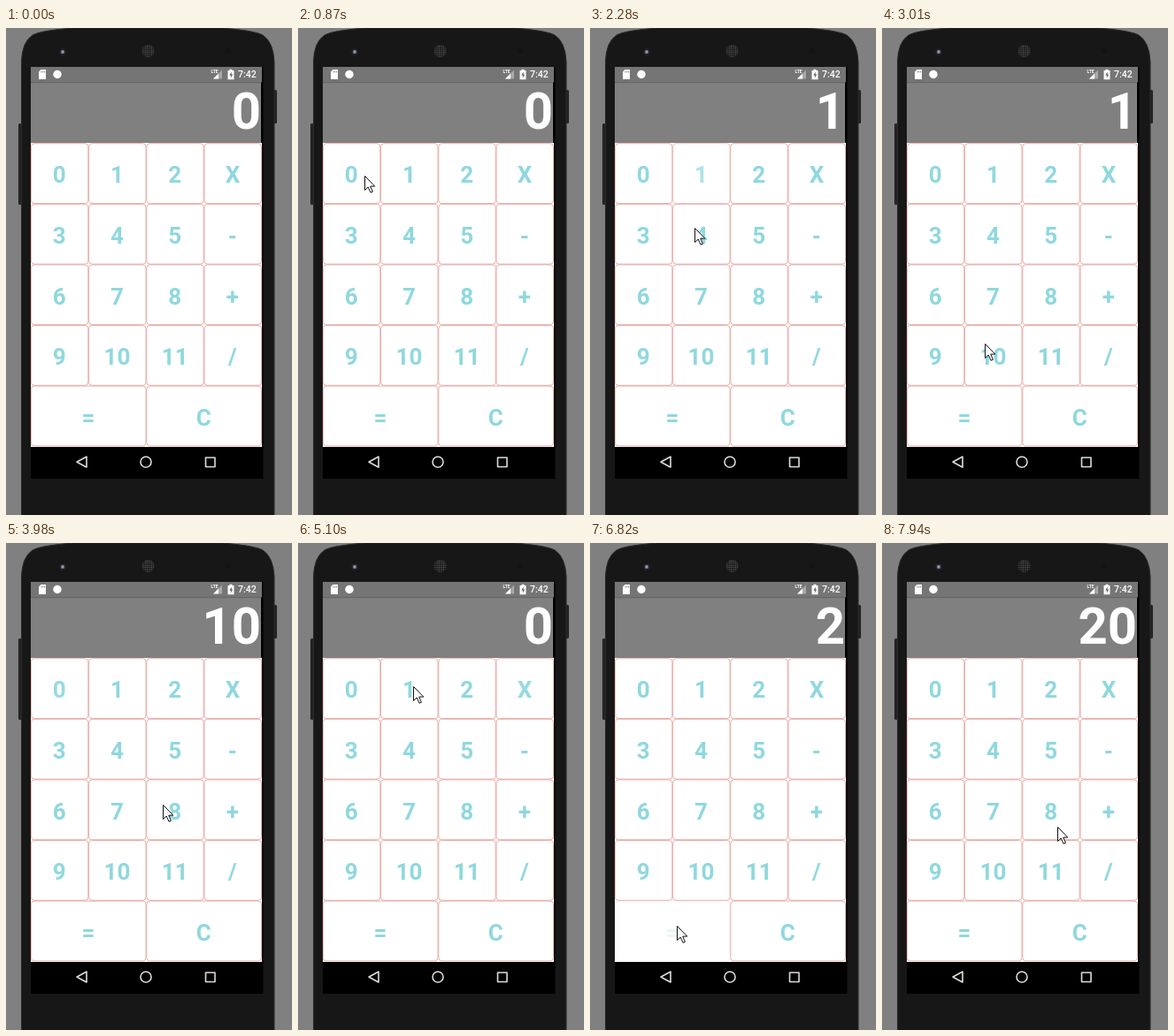
Write an HTML page that moves like this. It is 323 px wide and 551 px high and loops after 8000 ms.

```html
<!DOCTYPE html>
<html lang="en">
<head>
<meta charset="utf-8">
<title>Calculator</title>
<style>
html, body { margin: 0; width: 100%; height: 100%; overflow: hidden; background: #808080; }
svg { display: block; width: 100%; height: 100%; }
text { font-family: Roboto, Arial, sans-serif; font-weight: 700; }
.key text { font-size: 26px; fill: #8fd8de; text-anchor: middle; }
.key rect { fill: #fff; stroke: #e59b95; stroke-width: .8; }
#total { font-size: 58px; fill: #fff; text-anchor: end; }
.nav { fill: none; stroke: #dcdcdc; stroke-width: 1.6; stroke-linejoin: round; }
</style>
</head>
<body>
<svg viewBox="0 0 323 551">
  <defs>
    <pattern id="mesh" width="2.4" height="2.4" patternUnits="userSpaceOnUse">
      <rect width="2.4" height="2.4" fill="#161616"/>
      <circle cx="1.2" cy="1.2" r=".8" fill="#5a5a5a"/>
    </pattern>
  </defs>
  <rect width="323" height="551" fill="#808080"/>

  <!-- phone body -->
  <rect x="14" y="108" width="4" height="92" rx="1.5" fill="#232323"/>
  <rect x="302" y="70" width="4" height="38" rx="1.5" fill="#232323"/>
  <path d="M17.5 553V38Q18 16 30 8Q38 3 75 0H245Q281 3 290 8Q302 16 303 38V553Z" fill="#171717" stroke="#2c2c2c"/>
  <circle cx="64" cy="27" r="3.8" fill="#202329"/>
  <circle cx="64" cy="27" r="1.9" fill="#8e97a5"/>
  <circle cx="160.5" cy="26" r="7" fill="url(#mesh)"/>
  <circle cx="251" cy="26" r="3" fill="#131313"/>

  <!-- screen -->
  <rect x="28" y="44" width="262.5" height="466" fill="#000"/>
  <rect x="28" y="44" width="261" height="17.5" fill="#757575"/>
  <rect x="28" y="61" width="260" height="69" fill="#808080"/>
  <rect x="28" y="61" width="260" height="1.2" fill="#666"/>
  <rect x="28" y="130" width="261" height="344" fill="#fff"/>

  <!-- status bar -->
  <path d="M39.5 47H45V58H37V49.5Z" fill="#fff"/>
  <path d="M40 48.5v2M41.8 48.5v2M43.6 48.5v2" stroke="#757575" stroke-width=".8"/>
  <circle cx="58" cy="52.5" r="4.7" fill="#fff"/>
  <path d="M244 47.5V57.5H234Z" fill="#a8a8a8"/>
  <path d="M240 51.5V57.5H234Z" fill="#fff"/>
  <text x="231.5" y="51" font-size="5" fill="#fff">LTE</text>
  <path d="M250.5 48h2v-1.2h3V48h2v10.2h-7Z" fill="#fff"/>
  <path d="M254.8 49.5l-2.6 4h1.6v3l2.4-4h-1.6Z" fill="#666"/>
  <text x="262" y="56.3" font-size="10.5" fill="#fff" style="font-weight:500">7:42</text>

  <text id="total" x="288" y="114"></text>
  <g id="keys"></g>

  <!-- navigation -->
  <g class="nav">
    <path d="M80 491L91 485V497Z"/>
    <circle cx="158" cy="491" r="6"/>
    <rect x="225.5" y="486" width="10.5" height="10.5"/>
  </g>

  <path id="cursor" d="M.5 .5V16.5L4.2 13L7 19.2L9.4 18.2L6.7 12.1H11.8Z" fill="#fff" stroke="#111"/>
</svg>
<script>
const LOOP = 8000, FADE = 240, DIM = 0.2;
const $ = id => document.getElementById(id);
const total = $('total'), cursor = $('cursor');

const keys = {};
function addKey(label, col, row, span = 1) {
  const w = 65.2, h = 68.6, x = 28 + col * w, y = 130.3 + row * h;
  const g = document.createElementNS('http://www.w3.org/2000/svg', 'g');
  g.setAttribute('class', 'key');
  g.innerHTML =
    `<rect x="${x + .4}" y="${y + .4}" width="${w * span - .8}" height="${h - .8}" rx="3.5"/>` +
    `<text x="${x + w * span / 2 - .3}" y="${y + h / 2 + 10.7}">${label}</text>`;
  $('keys').append(g);
  keys[label] = g;
}
['0 1 2 X', '3 4 5 -', '6 7 8 +', '9 10 11 /'].forEach((line, row) =>
  line.split(' ').forEach((label, col) => addKey(label, col, row)));
addKey('=', 0, 4, 2);
addKey('C', 2, 4, 2);

const presses = [
  { key: '1', down: 1980, up: 2120, shows: '1' },
  { key: '0', down: 3600, up: 3760, shows: '10' },
  { key: 'X', down: 4740, up: 4880, shows: '0' },
  { key: '2', down: 5450, up: 5800, shows: '2' },
  { key: '=', down: 6820, up: 6880, shows: '20' }
];

// pointer stops: arrival time, x, y, rest
const stops = [
  [350, 244, 476],
  [910, 62, 144],
  [1230, 68, 153, 300],
  [1680, 91, 155],
  [1980, 118, 165, 140],
  [2700, 119, 385],
  [3010, 116, 357, 140],
  [3450, 77, 178, 310],
  [3980, 177, 296],
  [4120, 214, 320],
  [4490, 247, 165, 390],
  [5100, 130, 162, 100],
  [5450, 185, 180, 240],
  [5980, 188, 362],
  [6210, 130, 480],
  [6590, 98, 433, 1130],
  [7940, 198, 321, 60]
];

const clamp = k => Math.min(1, Math.max(0, k));

function pointer(t) {
  const i = Math.max(1, stops.findIndex(s => s[0] >= t));
  const next = t > stops.at(-1)[0] ? stops.length - 1 : i;
  const [t0, x0, y0, rest = 0] = stops[next - 1], [t1, x1, y1] = stops[next];
  const k = clamp((t - t0 - rest) / (t1 - t0 - rest));
  return [x0 + (x1 - x0) * k, y0 + (y1 - y0) * k].map(Math.round);
}

function draw(t) {
  let shown = '0';
  for (const { key, down, up, shows } of presses) {
    if (t >= up) shown = shows;
    const back = clamp((t - up) / FADE);
    keys[key].setAttribute('opacity', t < down ? 1 : DIM + (1 - DIM) * back);
  }
  total.textContent = shown;
  cursor.setAttribute('visibility', t < stops[0][0] ? 'hidden' : 'visible');
  cursor.setAttribute('transform', `translate(${pointer(t)})`);
}

function tick() {
  draw(performance.now() % LOOP);
  requestAnimationFrame(tick);
}
tick();
</script>
</body>
</html>
```
